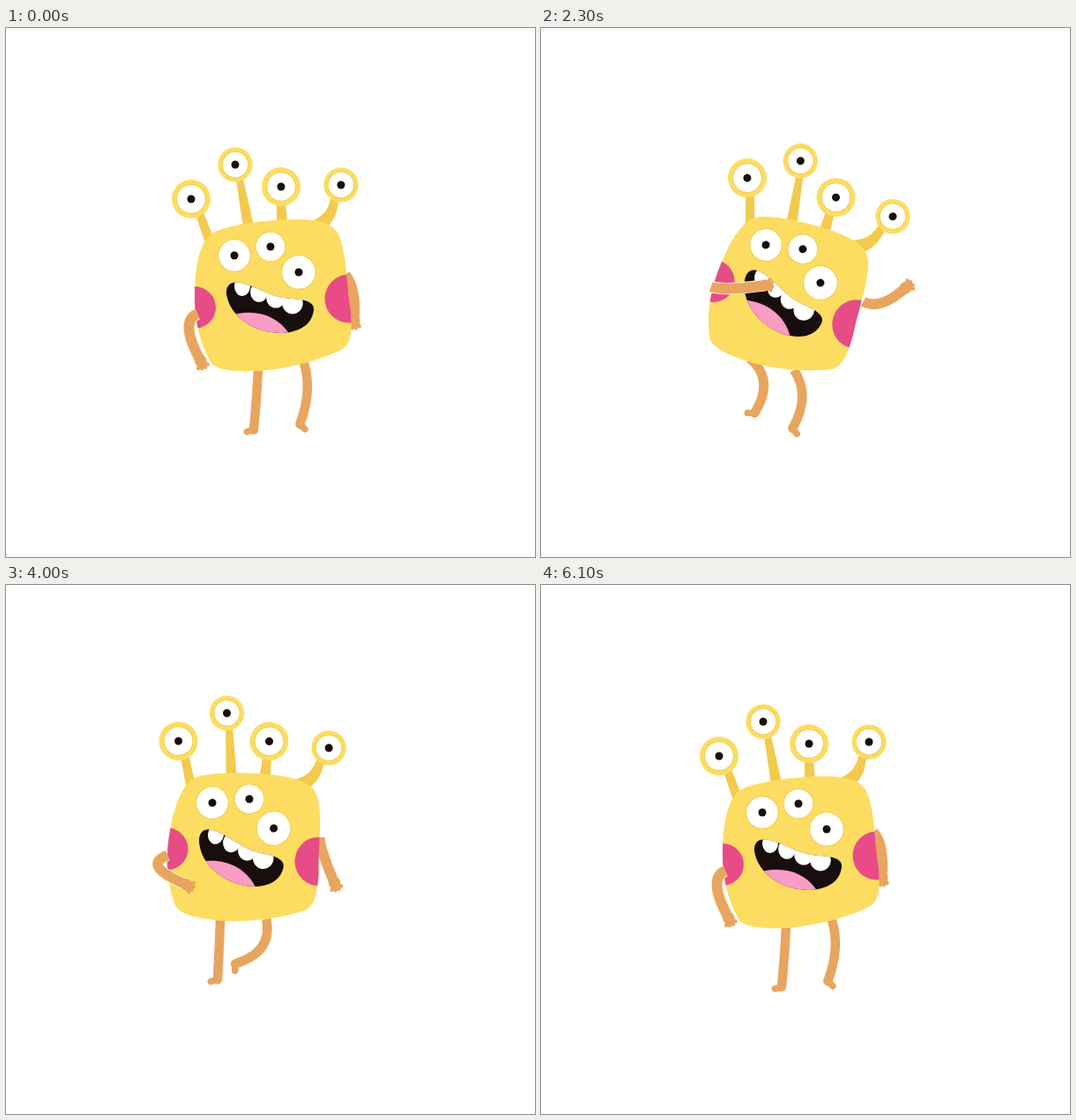
Recreate the animation shown at these times as an HTML page with a canvas. Size 600 by 600 pixels, loop 6.2 s.

```html
<!DOCTYPE html>
<html lang="en">
<head>
<meta charset="utf-8">
<title>Dancing monster</title>
<style>
html, body { margin: 0; width: 100%; height: 100%; overflow: hidden; background: #fff; }
canvas { display: block; width: 600px; height: 600px; }
</style>
</head>
<body>
<canvas id="stage" width="600" height="600"></canvas>
<script>
const ctx = document.getElementById('stage').getContext('2d');
const LOOP = 6200, STEP = 100;
const SKIN = '#fcdd62', STALK = '#f3ca4c', RING = '#f3cf58', LIMB = '#e8a55f', HALO = '#fff3d0';
const PINK = '#e84c86', INK = '#170e0d', TONGUE = '#f99cc6';
const EYE = { x: 259, y: 258 };  // the body turns about this eye
const rad = deg => deg * Math.PI / 180;

// Position of the first eye, tilt, then two bone angles (degrees) for each limb.
const pose = (x, y, tilt, armL, armR, legL, legR) =>
  [x, y, tilt, ...armL, ...armR, ...legL, ...legR];

const stand = pose(259, 258, 0, [128, 67], [62, 90], [93, 95], [81, 105]);
const sway = pose(259, 250, 12.8, [111, 29], [79, 42], [70, 101], [70, 138]);
const step = pose(256, 247, 8, [138, 29], [78, 68], [92, 93], [93, 152]);
const reach = pose(255, 246, 20.2, [8, -6], [10, -35], [54, 111], [69, 111]);
const calm = pose(255, 246, 17, [-6, -20], [18, -24], [40, 113], [77, 99]);
const run = pose(237, 258, 7.8, [96, 30], [40, 38], [99, 192], [57, 103]);

const mix = (a, b, k) => a.map((v, i) => v + (b[i] - v) * k);
const clamp = k => Math.min(1, Math.max(0, k));
const slide = ([x, ...rest], dx) => [x + dx, ...rest];

// The dance repeats every 6 steps, drifting left and calming down, then ends in a rest.
const PERIOD = 6, ROUNDS = 7, DRIFT = -5.5;
const keys = [[0, stand]];
for (let k = 0; k < ROUNDS; k++) {
  const beat = k * PERIOD;
  keys.push(
    [beat + 4, slide(step, DRIFT * (k - 2))],
    [beat + 5, slide(mix(reach, calm, clamp((k - 3) / 2)), DRIFT * (k - 3))],
    [beat + 7, slide(sway, DRIFT * k)]);
}
keys.push([45, run], [50, slide(stand, -5)], [61, slide(stand, -8)]);

function poseAt(n) {
  const i = Math.max(1, keys.findIndex(([at]) => at >= n));
  const [t0, a] = keys[i - 1], [t1, b] = keys[i];
  return mix(a, b, (n - t0) / (t1 - t0));
}

const body = new Path2D('M214 300C215 262 222 238 237 231C258 222 300 217 330 217C356 217 371 222 377 234C387 256 386 290 391 320C393 348 391 359 380 365C350 380 312 387 288 389C262 390 240 389 233 380C222 362 213 335 214 300Z');
const mouth = new Path2D('M250 302C249 291 256 287 266 289C288 294 300 306 325 307C340 308 350 311 349 320C347 338 330 346 310 346C280 345 254 327 250 302Z');
const tongue = new Path2D('M252 327C280 317 308 325 322 348L262 352Z');
const stalks = new Path2D('M215 212L226 244L236 240L224 209ZM261 172L269 226L281 224L269 171ZM307 198L307 222L319 222L317 198ZM368 194C365 208 358 214 347 219L364 226C373 218 376 208 377 195Z');
const topEyes = [[210, 194, 22], [260, 155, 19.7], [312, 180, 22], [380, 178, 19.7]];
const faceEyes = [[259, 258, 17.8], [300, 248, 16.3], [332, 277, 18.8]];

function fill(path, color) {
  ctx.fillStyle = color;
  ctx.fill(path);
}

function oval(x, y, rx, color, ry = rx) {
  ctx.beginPath();
  ctx.ellipse(x, y, rx, ry, 0, 0, 7);
  ctx.fillStyle = color;
  ctx.fill();
}

function group(draw) {
  ctx.save();
  draw();
  ctx.restore();
}

function eye(x, y, r) {
  oval(x, y, r + 1.2, RING);
  oval(x, y, r, '#fff');
  oval(x, y, 4.5, INK);
}

const along = ([x, y], angle, length) =>
  [x + length * Math.cos(rad(angle)), y + length * Math.sin(rad(angle))];

// Carry a point of the upright body into the stage.
function joint([px, py, tilt], x, y) {
  const c = Math.cos(rad(tilt)), s = Math.sin(rad(tilt));
  x -= EYE.x;
  y -= EYE.y;
  return [px + x * c - y * s, py + x * s + y * c];
}

function line(from, to, width) {
  ctx.beginPath();
  ctx.moveTo(...from);
  ctx.lineTo(...to);
  ctx.lineWidth = width;
  ctx.strokeStyle = LIMB;
  ctx.stroke();
}

// A soft two-bone limb; returns its far end.
function limb(root, [upper, lower], [len1, len2], width, halo) {
  const bend = along(root, upper, len1), end = along(bend, lower, len2);
  const middle = mix(root, end, 0.5);
  const path = new Path2D();
  path.moveTo(...root);
  path.quadraticCurveTo(...mix(middle, bend, 1.6), ...end);
  ctx.lineCap = 'butt';
  for (const [w, color] of [[halo ? width + 2 : 0.1, HALO], [width, LIMB]]) {
    ctx.lineWidth = w;
    ctx.strokeStyle = color;
    ctx.stroke(path);
  }
  ctx.lineCap = 'round';
  return end;
}

function arm(root, angles, lengths, halo) {
  const hand = limb(root, angles, lengths, 11.5, halo);
  oval(...hand, 6.8, LIMB);
  for (let i = -1.5; i < 2; i++) line(hand, along(hand, angles[1] + i * 27, 9), 4.2);
}

function leg(root, angles, turn) {
  const ankle = limb(root, angles, [33, 38], 10.5);
  oval(...ankle, 5.2, LIMB);
  line(ankle, along(ankle, angles[1] + turn, 8), 7.5);
}

function drawBody([x, y, tilt]) {
  ctx.translate(x, y);
  ctx.rotate(rad(tilt));
  ctx.translate(-EYE.x, -EYE.y);
  // Antennas lean a little further than the body.
  group(() => {
    ctx.translate(tilt * 0.15, 0);
    fill(stalks, STALK);
    for (const [ex, ey, r] of topEyes) {
      oval(ex, ey, r, SKIN);
      eye(ex, ey, r * 0.72);
    }
  });
  // Leaning also narrows the body.
  group(() => {
    ctx.translate(310, 0);
    ctx.scale(1 - tilt * 0.0023, 1);
    ctx.translate(-310, 0);
    fill(body, SKIN);
    ctx.clip(body);
    oval(213, 317, 25, PINK, 24);
    oval(389, 307, 27.5, PINK);
  });
  for (const e of faceEyes) eye(...e);
  group(() => {
    fill(mouth, INK);
    ctx.clip(mouth);
    fill(tongue, TONGUE);
    for (let i = 0; i < 4; i++) oval(268 + i * 19, 293 + i * 6.4, 9 + i * 0.9, '#fff', 11 + i * 0.4);
  });
}

function draw(now) {
  const p = poseAt(Math.floor((now % LOOP) / STEP));
  ctx.fillStyle = '#fff';
  ctx.fillRect(0, 0, 600, 600);
  leg(joint(p, 286, 385), p.slice(7, 9), 70);
  leg(joint(p, 338, 380), p.slice(9, 11), -60);
  arm(joint(p, 385, 280), p.slice(5, 7), [21, 33]);
  group(() => drawBody(p));
  arm(joint(p, 217, 324), p.slice(3, 5), [20, 41], true);
}

let start;
function tick(now) {
  if (start === undefined) start = now;
  draw(now - start);
  requestAnimationFrame(tick);
}
draw(0);
requestAnimationFrame(tick);
</script>
</body>
</html>
```
